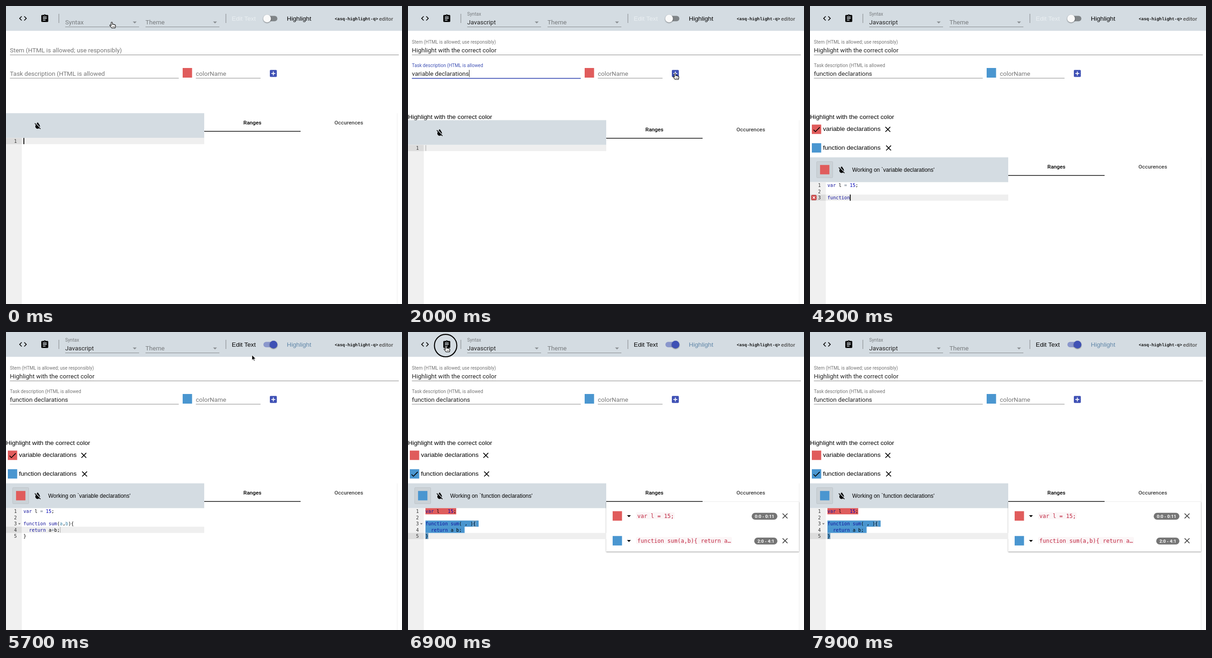
An HTML page for the animation above (8 s loop, 863 px wide and 649 px high).

```html
<!DOCTYPE html>
<html lang="en">
<head>
<meta charset="utf-8">
<title>Highlight question editor</title>
<style>
html, body { margin: 0; width: 100%; height: 100%; overflow: hidden; background: #fff; }
svg { display: block; width: 863px; height: 649px; }
text { white-space: pre; }
.ui { font: 13.5px Roboto, sans-serif; }
.small { font: 10.13px Roboto, sans-serif; }
.tab { font: 500 11.8px Roboto, sans-serif; }
.body { font: 13.7px "Liberation Sans", Arial, sans-serif; }
.work { font: 11.95px "Liberation Sans", Arial, sans-serif; }
.code { font: 10.13px "DejaVu Sans Mono", monospace; }
.snip { font: 12.1px "DejaVu Sans Mono", monospace; }
.tag { font: bold 9.27px "Liberation Mono", monospace; }
.pill { font: bold 9.8px Roboto, sans-serif; }
.card { filter: drop-shadow(0 1px 1.2px rgba(0,0,0,.45)); }
.knob { filter: drop-shadow(0 1px 1px rgba(0,0,0,.5)); }
</style>
</head>
<body>
<svg id="stage" viewBox="0 0 863 649"></svg>
<script>
const STEP = 100, COUNT = 80;
const RED = '#e05c5c', BLUE = '#4a96d0', INDIGO = '#3f51b5', BAR = '#d4dce2', GREY = '#757575';
const STEM = 'Highlight with the correct color';
const TASKS = ['variable declarations', 'function declarations'];
const CHAR = 6.1, ROW = 13.5, LEFT = 38;

const ICON = {
  code: 'M9.4 16.6L4.8 12l4.6-4.6L8 6l-6 6 6 6 1.4-1.4zm5.2 0l4.6-4.6-4.6-4.6L16 6l6 6-6 6-1.4-1.4z',
  clip: 'M19 3h-4.18C14.4 1.84 13.3 1 12 1c-1.3 0-2.4.84-2.82 2H5c-1.1 0-2 .9-2 2v14c0 1.1.9 2 2 2h14c1.1 0 2-.9 2-2V5c0-1.1-.9-2-2-2zm-7 0c.55 0 1 .45 1 1s-.45 1-1 1-1-.45-1-1 .45-1 1-1zm2 14H7v-2h7v2zm3-4H7v-2h10v2zm0-4H7V7h10v2z',
  drop: 'M18 14c0-4-6-10.8-6-10.8s-1.33 1.51-2.73 3.52l8.59 8.59c.09-.42.14-.86.14-1.31zm-.88 3.12L12.5 12.5 5.27 5.27 4 6.55l3.32 3.32C6.55 11.33 6 12.79 6 14c0 3.31 2.69 6 6 6 1.52 0 2.9-.57 3.96-1.5l2.63 2.63 1.27-1.27-2.74-2.74z',
  check: 'M9 16.17L4.83 12l-1.42 1.41L9 19 21 7l-1.41-1.41z',
  close: 'M19 6.41L17.59 5 12 10.59 6.41 5 5 6.41 10.59 12 5 17.59 6.41 19 12 13.41 17.59 19 19 17.59 13.41 12z',
  caret: 'M7 10l5 5 5-5z'
};

// step, x, y, shape
const POINTER = [
  [0, 230.5, 35, 'hand'], [2, 200, 52, 'hand'], [3, 220, 96, 'beam'], [4, 0, 0, ''],
  [11, 200, 147, 'beam'], [13, 0, 0, ''], [19, 480, 150, 'arrow'], [20, 582, 147, 'hand'],
  [22, 300, 150, 'beam'], [23, 0, 0, ''], [28, 340, 151, 'beam'], [29, 372, 151, 'beam'],
  [30, 395, 146, 'hand'], [32, 582, 147, 'hand'], [33, 110, 390, 'beam'], [34, 0, 0, ''],
  [53, 420, 180, 'arrow'], [55, 577, 28, 'hand'], [57, 536, 50, 'arrow'], [59, 38, 390, 'beam'],
  [60, 104, 390, 'beam'], [62, 14, 309, 'hand'], [63, 38, 417, 'beam'], [65, 44, 444, 'beam'],
  [66, 60, 260, 'arrow'], [68, 83, 30.5, 'hand'], [73, 83, 30.5, 'hand'], [74, 0, 0, '']
];

const rect = (x, y, w, h, fill, more = '') => `<rect x="${x}" y="${y}" width="${w}" height="${h}" fill="${fill}" ${more}/>`;
const text = (x, y, cls, fill, s, more = '') => `<text x="${x}" y="${y}" class="${cls}" fill="${fill}" ${more}>${s}</text>`;
const icon = (name, cx, cy, fill = '#000', k = .844) =>
  `<path d="${ICON[name]}" fill="${fill}" transform="translate(${cx - 12 * k} ${cy - 12 * k}) scale(${k})"/>`;
const typed = (s, n, start, rate) => s.slice(0, Math.max(0, (n - start) * rate));
const MID = 'text-anchor="middle"';

function field(x, y, w, label, value, focus, caretX) {
  const tint = focus ? INDIGO : GREY;
  const up = focus || value;
  return text(x, up ? y - 19 : y, up ? 'small' : 'ui', tint, label) +
    (value ? text(x, y, 'ui', '#212121', value) : '') +
    (focus ? rect(x, y + 5, w, 1.8, INDIGO) : rect(x, y + 5, w, 1, '#858585'));
}

function select(x, label, value) {
  return text(x, value ? 21 : 40, value ? 'small' : 'ui', '#777b7e', label) +
    (value ? text(x, 40, 'ui', '#212121', value) : '') +
    rect(x, 45, 161, 1, '#85898c') + icon('caret', x + 151.5, 35.4, '#8a8f93');
}

function header(n) {
  const on = n >= 56;
  const knob = on ? 583 : 569;
  return rect(0, 0, 863, 54, BAR) + icon('code', 37, 27) + icon('clip', 84.5, 27.2) +
    rect(114.7, 17, 1, 20, '#7d8184') + rect(478.7, 17, 1, 20, '#7d8184') +
    select(129, 'Syntax', n >= 2 ? 'Javascript' : '') + select(304, 'Theme', '') +
    text(492, 32.2, 'body', on ? '#000' : '#eaeff2', 'Edit Text') +
    rect(561, 21.4, 30.4, 11.8, on ? INDIGO : '#000', `rx="5.9" opacity="${on ? .5 : .4}"`) +
    `<circle class="knob" cx="${knob}" cy="27.4" r="8.4" fill="${on ? INDIGO : '#fafafa'}"/>` +
    text(612, 32.2, 'body', on ? '#5f86a8' : '#000', 'Highlight') +
    text(716.4, 31.2, 'tag', '#111', '&lt;asq-highlight-q&gt;') +
    text(813, 31.6, 'tab', '#555', 'editor');
}

function form(n, stem, task) {
  const stemFocus = n >= 3 && n < 11;
  const taskFocus = n >= 11 && n < 30;
  return field(8.5, 101, 847.5, 'Stem (HTML is allowed; use responsibly)', stem, stemFocus) +
    field(8.5, 151.7, 368, 'Task description (HTML is allowed', task, taskFocus) +
    rect(385, 135, 20.5, 21, n >= 31 ? BLUE : RED) +
    field(413.7, 151.7, 141, 'colorName', '', false) +
    rect(575, 139.3, 15.2, 15.2, INDIGO, 'rx="1.7"') +
    rect(578.3, 146, 8.6, 1.8, '#fff') + rect(581.7, 142.6, 1.8, 8.6, '#fff');
}

function taskList(count, active) {
  return TASKS.slice(0, count).map((name, i) => {
    const y = 268.5 + i * 40.5;
    return rect(4, y - 10.2, 20.4, 20.4, i ? BLUE : RED) +
      (i === active ? icon('check', 14.3, y + .4) : '') +
      text(28.2, y + 3.8, 'body', '#000', name) + icon('close', i ? 171.3 : 169.6, y + .2);
  }).join('');
}

function codeLines(n) {
  const lines = [n < 35 ? typed('var l', n, 33, 5) : 'var l = 15;'];
  if (n >= 36) lines.push('');
  if (n >= 38) lines.push(typed('function sum(a,b){', n, 38, 2));
  if (n === 47) lines[2] += '}';
  if (n >= 48) lines.push('  ' + typed('return a+b;', n, 48, 3), '}');
  return lines;
}

function tint(line, marked) {
  const soft = marked ? ' opacity=".15"' : '';
  const span = (fill, s, more = '') => `<tspan fill="${fill}"${more}>${s}</tspan>`;
  return line
    .split(/(\bvar\b|\bfunction\b|\breturn\b|\d+|[=+]|\bsum\b|[(,][ab])/)
    .map(s => {
      if (/^(var|function|return|sum)$/.test(s)) return span('#14149c', s);
      if (/^\d/.test(s)) return span('#0000b8', s);
      if (/^[=+]$/.test(s)) return span('#687687', s, soft.replace('opacity', 'fill-opacity'));
      if (/^[(,][ab]$/.test(s)) return s[0] + span('#3a84a8', s[1], soft.replace('opacity', 'fill-opacity'));
      return s;
    }).join('');
}

function editor(n, top) {
  const lines = codeLines(n);
  const rowY = i => top + i * ROW;
  const red = n >= 60, blue = n >= 65;
  let row = n >= 65 ? 4 : n >= 60 ? 0 : Math.min(lines.length - 1, 3);
  let col = lines[row].length - (n === 47 ? 1 : 0);
  const mark = (i, c, fill) => rect(LEFT, rowY(i), c * CHAR, ROW, fill);
  let out = rect(0, top, 34.5, 649 - top, '#f0f0f0') +
    rect(0, rowY(row), 34.5, ROW, '#dcdcdc') + rect(34.5, rowY(row), 397.5, ROW, '#efefef');
  if (red) out += mark(0, 11, RED);
  if (blue) {
    out += mark(2, 19, BLUE) + mark(3, 14, BLUE) + mark(4, 1, BLUE);
    const edge = 'stroke="#a9b4bb" stroke-width=".9"';
    out += rect(LEFT + 17 * CHAR, rowY(2) + .5, CHAR, ROW - 1, 'none', edge) +
      rect(LEFT, rowY(4) + .5, CHAR, ROW - 1, 'none', edge);
  } else if (n === 64) {
    out += mark(2, 19, '#b5d5ff') + mark(3, 8, '#b5d5ff');
  }
  lines.forEach((s, i) => {
    out += text(23.5, rowY(i) + 10.4, 'code', '#333', i + 1, 'text-anchor="end"') +
      text(LEFT, rowY(i) + 10.4, 'code', '#000', tint(s, i ? blue : red));
  });
  if (n >= 40 && n < 47) {
    const y = rowY(2) + 1.2;
    out += rect(3, y, 11, 11, '#cf4a4a', 'rx="2" stroke="#a83a3a" stroke-width=".6"') +
      `<path d="M6 ${y + 3}l5 5m0-5l-5 5" stroke="#fff" stroke-width="1.5"/>`;
  }
  if (n >= 47) out += `<path d="M26.5 ${rowY(2) + 5.8}h5.4l-2.7 3z" fill="#777"/>`;
  const live = n < 2 || (n >= 33 && n < 55);
  const x = LEFT + col * CHAR;
  if (live) out += rect(x, rowY(row), 1.8, ROW, '#000');
  else if (n < 65) out += rect(x + .4, rowY(row) + .5, .9, ROW - 1, '#999');
  return out;
}

function ranges(n, y) {
  const rows = [
    [RED, 'var l = 15;', '0:0 - 0:11', 749, 84],
    [BLUE, 'function sum(a,b){ return a…', '2:0 - 4:1', 754.5, 209]
  ].slice(0, n >= 65 ? 2 : n >= 60 ? 1 : 0);
  if (!rows.length) return '';
  return rect(432, y + 40, 420, 54 * rows.length + .6, '#fff', 'class="card"') +
    rect(642, y + 39.5, 210, .8, '#ececec') +
    rows.map(([fill, code, span, px, w], i) => {
      const c = y + 71 + i * 54;
      return rect(446, c - 10.3, 20.4, 20.6, fill) + icon('caret', 481.5, c + .2) +
        rect(497, c - 8, w, 15.5, '#fbf6f7', 'rx="3"') +
        text(499.8, c + 4.2, 'snip', '#c0243f', code) +
        rect(px, c - 6.9, 805 - px, 15, GREY, 'rx="7.5"') +
        text((px + 805) / 2, c + 4.2, 'pill', '#fff', span, MID) +
        icon('close', 821.7, c, '#444');
    }).join('');
}

function panel(n, y, count, active) {
  let out = rect(0, y, 432, 54, BAR) + icon('drop', 69, y + 27.2);
  if (count) {
    out += rect(14.5, y + 9.3, 35, 35, '#cbd2d7', 'rx="1.5" stroke="#bcc3c8"') +
      rect(21.9, y + 16.6, 20.4, 20.4, active ? BLUE : RED) +
      text(92, y + 31, 'work', '#000', 'Working on `' + TASKS[active] + "'");
  }
  return out + rect(852.2, y, .9, 649 - y, '#ebebeb') + ranges(n, y) +
    rect(432, y + 38.6, 210, 1.7, '#2b2b2b') +
    text(537, y + 24.6, 'tab', '#000', 'Ranges', MID) +
    text(747, y + 24.6, 'tab', '#3c3c3c', 'Occurences', MID) + editor(n, y + 54);
}

function pointer(n) {
  const i = POINTER.findLastIndex(p => p[0] <= n);
  const a = POINTER[i], b = POINTER[i + 1];
  if (!a[3]) return '';
  const k = b && b[3] ? (n - a[0]) / (b[0] - a[0]) : 0;
  const x = a[1] + k * (b ? b[1] - a[1] : 0), y = a[2] + k * (b ? b[2] - a[2] : 0);
  const shape = {
    hand: '<path d="M-1.4 1.4C-1.4-.4 1.4-.4 1.4 1.4V5C2 4.2 3.8 4.3 4 5.4 4.8 4.8 6.2 5.2 6.4 6.2 7.4 5.8 8.2 6.4 8.2 7.6V9.5C8.2 11 7.3 11.8 7.2 13H0C-.8 11-3.6 9.2-4.4 7.2-4.6 6-2.8 5.8-1.4 7.6Z" fill="#fff" stroke="#000" stroke-width="1.1"/><path d="M2 9v2.5m2-2.5v2.5m2-2.5v2.5" stroke="#000" stroke-width=".7"/>',
    arrow: '<path d="M0 0V11.5L2.7 9 4.6 13.2 6.4 12.4 4.6 8.4H8.2Z" fill="#000" stroke="#fff" stroke-width=".9"/>',
    beam: '<path d="M-2.5-6.3Q0-6.3 0-4.6 0-6.3 2.5-6.3M0-5V5.4M-2.5 6.6Q0 6.6 0 5 0 6.6 2.5 6.6M-1.3 2.4H1.3" fill="none" stroke="#000" stroke-width="1.1"/>'
  }[a[3]];
  return `<g transform="translate(${x} ${y})">${shape}</g>`;
}

function scene(n) {
  const stem = typed(STEM, n, 3, 5);
  const task = n < 22 ? typed(TASKS[0], n, 12, 4) : typed(TASKS[1], n, 22, 4);
  const count = n >= 32 ? 2 : n >= 21 ? 1 : 0;
  const active = n >= 62 ? 1 : 0;
  const y = 233.4 + (stem ? 15.2 : 0) + count * 40.5;
  const ring = n >= 68 && n < 74
    ? '<circle cx="82" cy="29.6" r="24.4" fill="none" stroke="#000" stroke-width="2.2"/>' : '';
  return header(n) + form(n, stem, task) + text(0, 246, 'body', '#000', stem) +
    taskList(count, active) + panel(n, y, count, active) + ring + pointer(n);
}

const stage = document.getElementById('stage');

function placeCaret(n) {
  const inStem = n >= 3 && n < 11, inTask = n >= 11 && n < 28;
  if (!inStem && !inTask) return;
  const base = inStem ? 101 : 151.7;
  const value = [...stage.querySelectorAll('text.ui')].find(
    el => +el.getAttribute('y') === base && el.getAttribute('x') === '8.5');
  const x = 8.5 + (value ? value.getComputedTextLength() : 0);
  stage.insertAdjacentHTML('beforeend', rect(x + .2, base - 12.5, 1, 15.5, '#222'));
}

let shown = -1;
function tick(now) {
  const n = Math.floor(now / STEP) % COUNT;
  if (n !== shown) {
    shown = n;
    stage.innerHTML = scene(n);
    placeCaret(n);
  }
  requestAnimationFrame(tick);
}
const begin = performance.now();
tick(0);
requestAnimationFrame(function start(now) { tick(Math.max(0, now)); });
</script>
</body>
</html>
```
